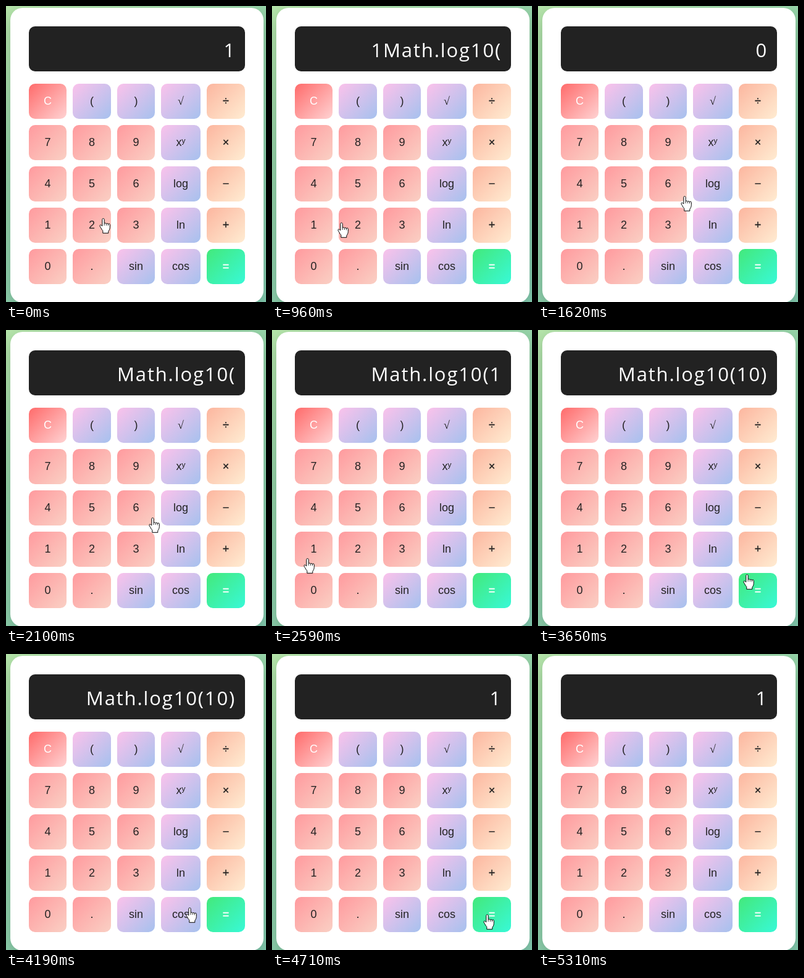
Write an HTML page that moves like this. It is 421 px wide and 480 px high and loops after 5.61 s.

```html
<!DOCTYPE html>
<html lang="en">
<head>
<meta charset="utf-8">
<title>Calculator</title>
<style>
  html, body { margin: 0; width: 100%; height: 100%; overflow: hidden; }
  body { position: relative; background: linear-gradient(150deg, #b6e6ab, #96d4a9 35%, #84ccb0); }
  .card {
    position: absolute; left: 7px; top: 3px; width: 410px; height: 478px; box-sizing: border-box;
    padding: 30px; border-radius: 20px; background: #fff; box-shadow: 0 10px 30px rgba(0, 0, 0, .2);
  }
  .display {
    height: 73px; margin-bottom: 20px; padding-right: 15px; border-radius: 10px; background: #222; color: #fff;
    font: 31px/76px "Open Sans", sans-serif; letter-spacing: 1.85px; text-align: right; white-space: pre;
  }
  .keys {
    display: grid; gap: 10px; grid-template-columns: 61px 62px 61px 64px 62px; grid-auto-rows: 57px;
    font: 18px/57px "Liberation Sans", Arial, sans-serif; text-align: center; color: #222;
  }
  .keys div { border-radius: 10px; background: linear-gradient(135deg, var(--from), var(--to)); }
  .digit { --from: #ff9a9e; --to: #fad0c4; }
  .func { --from: #fbc2eb; --to: #a6c1ee; }
  .op { --from: #fcb69f; --to: #ffecd2; }
  .clear { --from: #ff6b6b; --to: #ffd3d3; color: #fff; }
  .equals { --from: #43e97b; --to: #38f9d7; color: #fff; }
  .op, .equals { -webkit-text-stroke: .4px; }
  .func:nth-child(4) { font-family: "Liberation Serif", serif; }
  .keys .pressed { --from: #a1c4fd; --to: #c2e9fb; }
  #pointer { position: absolute; left: -6px; top: 0; }
</style>
</head>
<body>
<div class="card">
  <div class="display" id="display"></div>
  <div class="keys" id="keys"></div>
</div>
<svg id="pointer" width="19" height="26" fill="#fff" stroke="#000" stroke-linejoin="round">
  <path d="M6.5 .6C5.3 .6 4.8 1.5 4.8 2.6V13L3.4 11.6C2.4 10.6 .8 11 .9 12.4C1 13.6 1.8 14.3 2.5 15.5C3.5 17.4 4.3 19.1 5.8 20.5V24.3H14.8V21.3C16.3 19.5 17.3 17.3 17.3 14.5V10.6C17.3 8.7 15 8.4 14.4 10C14.2 8.2 11.8 8 11.4 9.3C11 7.7 8.6 7.6 8.2 8.8V2.6C8.2 1.5 7.6 .6 6.5 .6Z"/>
  <path d="M8.2 8.8V12M11.4 9.3V12M14.4 10V12.4" stroke-width=".8"/>
</svg>
<script>
const LOOP = 5610, HOLD = 100;
const labels = 'C ( ) √ ÷ 7 8 9 xʸ × 4 5 6 log − 1 2 3 ln + 0 . sin cos ='.split(' ');
const kindOf = label =>
  label === 'C' ? 'clear' : label === '=' ? 'equals' :
  /^[\d.]$/.test(label) ? 'digit' : '÷×−+'.includes(label) ? 'op' : 'func';

const keys = {};
for (const label of labels) {
  const key = keys[label] = document.createElement('div');
  key.className = kindOf(label);
  key.textContent = label;
  document.getElementById('keys').append(key);
}
const display = document.getElementById('display');
const pointer = document.getElementById('pointer');

const presses = Object.entries({ 330: 'log', 1320: 'C', 1920: 'log', 2460: '1', 2760: '0', 3190: ')', 4490: '=' })
  .map(([time, label]) => ({ time: +time, label }));

function enter(text, label) {
  if (label === 'C') return '0';
  if (label === '=') return String(Math.log10(parseFloat(text.split('(')[1])));
  return (text === '0' ? '' : text) + (label === 'log' ? 'Math.log10(' : label);
}

// The fingertip rests on each key while pressing it
function restOn({ time, label }) {
  const box = keys[label].getBoundingClientRect();
  const x = box.x + box.width / 2 - 6, y = box.y + box.height / 2 + 3;
  return [[time, x, y], [time + HOLD, x, y]];
}

// Time, x, y: turns taken between the presses
const turns = [
  [120, 157, 344], [960, 112, 352], [1260, 89, 166], [1620, 237, 308], [2590, 57, 370],
  [3690, 352, 422], [4190, 297, 411], [4310, 297, 411], [4890, 344, 416], [5300, 392, 482],
];
const path = [...turns, ...presses.flatMap(restOn)].sort((a, b) => a[0] - b[0]);

function positionAt(t) {
  const i = path.findIndex(p => p[0] > t);
  if (i < 1) return path.at(i).slice(1);
  const [t0, x0, y0] = path[i - 1], [t1, x1, y1] = path[i];
  const k = (t - t0) / (t1 - t0);
  return [x0 + (x1 - x0) * k, y0 + (y1 - y0) * k];
}

function draw(now) {
  const t = now % LOOP;
  const [x, y] = positionAt(t).map(Math.round);
  pointer.style.transform = `translate(${x}px, ${y}px)`;

  const pressed = presses.find(({ time }) => t >= time && t < time + HOLD);
  for (const label of labels) keys[label].classList.toggle('pressed', pressed?.label === label);

  display.textContent = presses
    .filter(({ time }) => t >= time + HOLD)
    .reduce((text, { label }) => enter(text, label), '1');
  requestAnimationFrame(draw);
}
requestAnimationFrame(draw);
</script>
</body>
</html>
```
